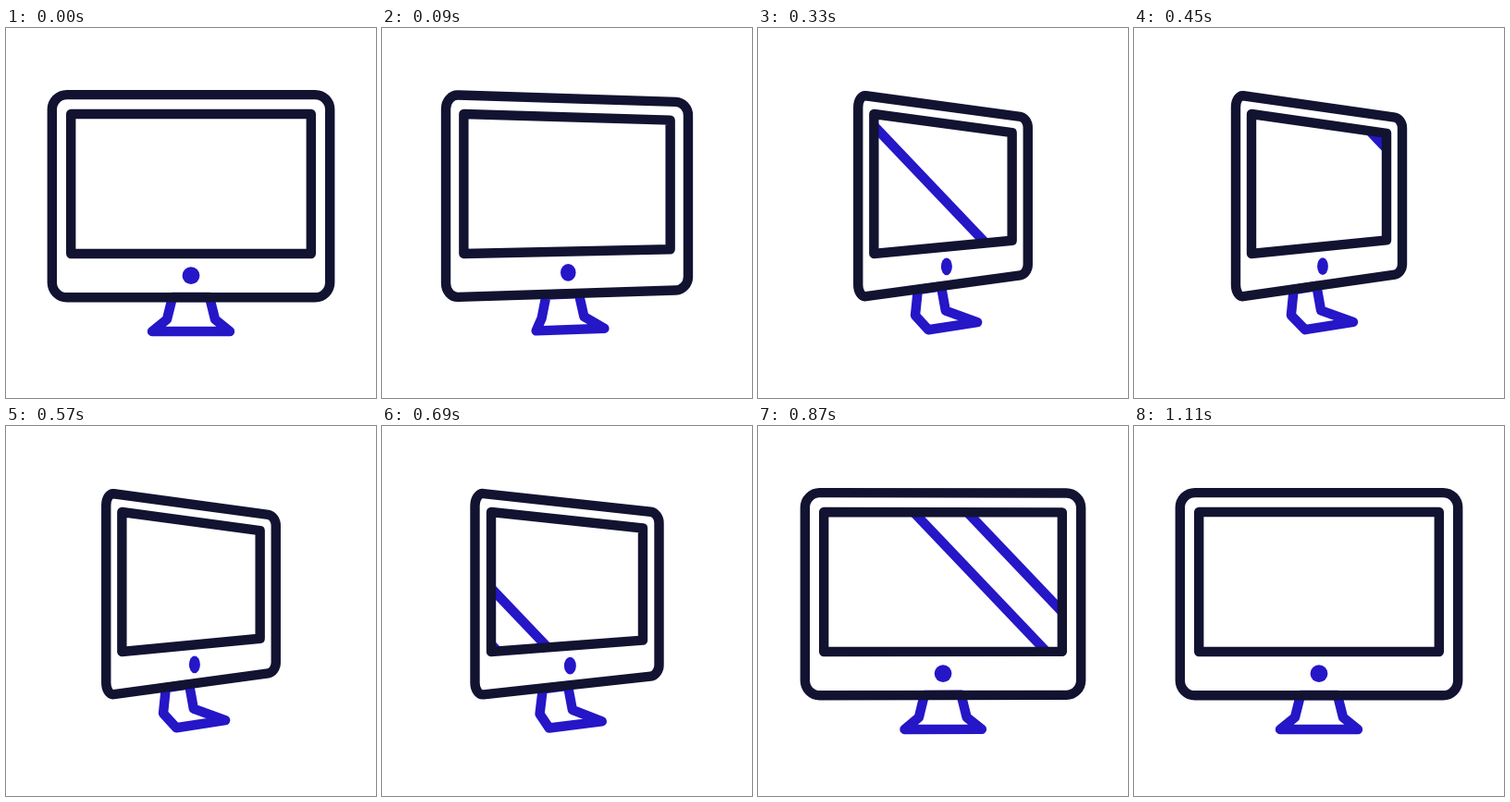
These frames come from a looping animation (400x400 px, 4.2 s). An HTML page with a canvas:

```html
<!DOCTYPE html>
<html lang="en">
<head>
<meta charset="utf-8">
<title>Monitor</title>
<style>
html, body { margin: 0; width: 100%; height: 100%; overflow: hidden; background: #fff; }
canvas { display: block; width: 400px; height: 400px; }
</style>
</head>
<body>
<canvas width="400" height="400"></canvas>
<script>
const ctx = document.querySelector('canvas').getContext('2d');
const DARK = '#121331', BLUE = '#2516c7';
const LOOP = 4200, STEP = 30, TURN = 450;
const CX = 200, CY = 181.5;

const CASE = { half: 150.2, turned: 90, top: 72.1, bottom: 291.3 };
const SCREEN = { half: 129.8, turned: 73, top: 93, bottom: 244 };
// Levels of the stand: half width, height, then sideways shift and lift when turned.
const STAND = [[20, 291, -15, 10], [26, 315, -14, 7], [42, 328, 11, 6]];
// Times in ms at which the stripes cross x = 0 on the line y = 98.
const STRIPES = [216, 647, 703];
const SLOPE = 1.05, SPEED = 1.035;

const mix = (a, b, p) => a + (b - a) * p;

// cubic-bezier(1/3, 0, 0, 1)
function ease(x) {
  let lo = 0, hi = 1;
  for (let i = 0; i < 24; i++) {
    const u = (lo + hi) / 2;
    if (u * (1 - u) ** 2 + u ** 3 < x) lo = u; else hi = u;
  }
  return lo * lo * (3 - 2 * lo);
}

// Narrows a panel and shrinks its right side; side runs from -1 to 1.
function turn(panel, side, y, p) {
  const far = (side + 1) / 2;
  return [CX + side * mix(panel.half, panel.turned, p), mix(y, CY, 0.235 * far * p)];
}

function panelPath(panel, radius, p) {
  const path = new Path2D();
  const dx = radius / panel.half;
  for (const [sx, sy] of [[-1, -1], [1, -1], [1, 1], [-1, 1]]) {
    const y = sy < 0 ? panel.top : panel.bottom;
    const ends = [
      k => turn(panel, sx, y - sy * radius * k, p),
      k => turn(panel, sx * (1 - dx * k), y, p)
    ];
    if (sx * sy < 0) ends.reverse();
    const [from, to] = ends;
    path.lineTo(...from(1));
    path.bezierCurveTo(...from(0.45), ...to(0.45), ...to(1));
  }
  path.closePath();
  return path;
}

function standPath(p) {
  const path = new Path2D();
  const add = (side, [half, y, shift, lift]) => path.lineTo(
    CX + shift * p + side * half * (1 - 0.38 * p),
    y - (lift + side * half * 0.1) * p
  );
  STAND.forEach(level => add(-1, level));
  [...STAND].reverse().forEach(level => add(1, level));
  path.closePath();
  return path;
}

function stroke(path, color) {
  ctx.strokeStyle = color;
  ctx.stroke(path);
}

function drawButton(p) {
  const [x, y] = turn(CASE, 0, 267.7, p);
  ctx.fillStyle = BLUE;
  ctx.beginPath();
  ctx.ellipse(x + 4 * p, y, mix(9.4, 5.9, p), 9.4, 0, 0, 2 * Math.PI);
  ctx.fill();
}

function drawStripes(screen, t) {
  ctx.save();
  ctx.clip(screen);
  for (const start of STRIPES) {
    const x = (t - start) * SPEED;
    const line = new Path2D();
    line.moveTo(x - 100, 98 - 100 * SLOPE);
    line.lineTo(x + 300, 98 + 300 * SLOPE);
    stroke(line, BLUE);
  }
  ctx.restore();
}

function draw(t) {
  const p = ease(Math.max(0, 1 - Math.abs(t - TURN) / TURN));
  const screen = panelPath(SCREEN, 0, p);
  ctx.fillStyle = '#fff';
  ctx.fillRect(0, 0, 400, 400);
  ctx.lineWidth = 10.4;
  ctx.lineJoin = 'round';
  stroke(standPath(p), BLUE);
  drawButton(p);
  drawStripes(screen, t);
  stroke(panelPath(CASE, mix(16, 13.5, p), p), DARK);
  stroke(screen, DARK);
}

const origin = performance.now();
function tick() {
  const t = (performance.now() - origin) % LOOP;
  draw(Math.floor(t / STEP) * STEP);
  requestAnimationFrame(tick);
}
tick();
</script>
</body>
</html>
```
